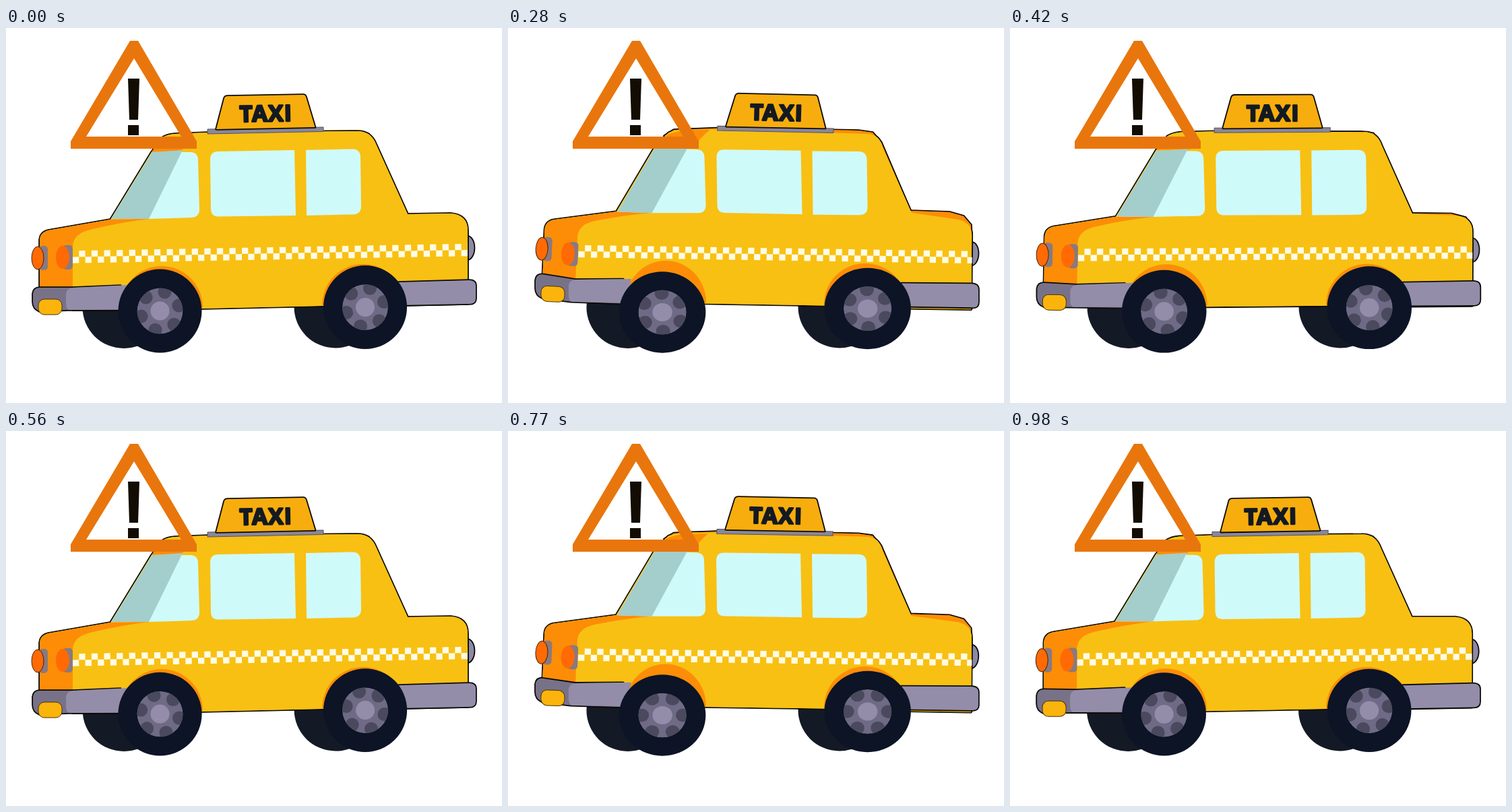
Recreate the animation shown at these times as an HTML page. Size 736 by 556 pixels, loop 1050 ms.

```html
<!DOCTYPE html>
<html lang="en">
<head>
<meta charset="utf-8">
<title>Taxi</title>
<style>
html, body { margin: 0; width: 100%; height: 100%; overflow: hidden; background: #fff; }
svg { display: block; width: 736px; height: 556px; }
text { font: 700 33px "Open Sans", "Noto Sans", sans-serif; letter-spacing: 1.6px; }
.line { stroke: #0b0904; stroke-width: 3.6; stroke-linejoin: round; paint-order: stroke; }
</style>
</head>
<body>
<svg id="stage" viewBox="0 0 736 556"></svg>
<script>
const STEP = 70, LOOP = 1050;
// Body tilt per step: 0 leans forward, 1 leans back.
const TILT = [0, .3, .68, .93, 1, .77, .35, .08, 0, .3, .68, .93, .97, .68, .09];
const YELLOW = '#f8c013', ORANGE = '#fd8d07', GLASS = '#cffafa', GREY = '#938daa';
const stage = document.getElementById('stage');
const mix = (a, b, k) => a + (b - a) * k;

const path = (d, fill, more = '') => `<path d="${d}" fill="${fill}" ${more}/>`;
const oval = (x, y, rx, ry, fill, more = '') =>
  `<ellipse cx="${x}" cy="${y}" rx="${rx}" ry="${ry}" fill="${fill}" ${more}/>`;
const box = (x, y, w, h, r, fill, more = '') =>
  `<rect x="${x}" y="${y}" width="${w}" height="${h}" rx="${r}" fill="${fill}" ${more}/>`;
const group = (matrix, body) => `<g transform="matrix(${matrix.join(' ')})">${body}</g>`;
const LINE = 'class="line"';

function wheel(x, y, q, turn, id) {
  let spots = '';
  for (let i = 0; i < 6; i++) {
    const a = (i * 60 + turn) * Math.PI / 180;
    spots += oval(29 * Math.cos(a), 29 * Math.sin(a), 10, 10, '#4b495d');
  }
  return `<g transform="translate(${x + q * .6} ${y + q * 2})">`
    + oval(0, 0, 62 + q * 2.3, 62 - q * 1.8, '#0c1426')
    + `<clipPath id="${id}"><circle r="34"/></clipPath>`
    + `<g transform="scale(${1 + q * .05} ${1 - q * .03})"><g clip-path="url(#${id})">`
    + oval(0, 0, 34, 34, '#6f6a85') + spots + '</g>'
    + oval(0, 0, 14, 14, GREY) + '</g></g>';
}

function arch(x, y, rx, ry) {
  return path(`M${x - rx},${y}A${rx},${ry} 0 0 1 ${x + rx},${y}Z`, ORANGE);
}

// Far edge of roof and boot, seen when the car leans back.
function farSide(p, more) {
  const from = [232,164, 246,159, 300,157, 520,155, 538,157, 549,176, 596,277, 655,277, 676,282, 684,296, 684,320];
  const to = [232,160, 246,151, 310,148.5, 520,152, 541,155, 554,170, 597,271, 655,273, 676,279, 687,292, 688,320];
  return path('M' + from.map((v, i) => mix(v, to[i], p)).join(' ') + 'L400,320Z', ORANGE, more);
}

function shell(p, more) {
  return path(`M50,390V316Q50,303 63,300L155,284L${216 - 8 * p},184L${231 - 4 * p},163Q238,158 250,157L300,155L520,153
    Q${541 - 2 * p},152 ${549 - 4 * p},172L${596 - 4 * p},${276 - 8 * p}L${660 - 2 * p},275Q${685 - 2 * p},277 ${685 - 2 * p},300
    L${685 + 2 * p},409L595,411L468,412L290,416L99,418Z`, YELLOW, more);
}

function shade(p) {
  return path('M50,390V316Q50,303 63,300L155,284L212,283Q165,289 125,299Q99,305 99,325V388Z', ORANGE)
    + path(`M${216 - 8 * p},184L${231 - 4 * p},165L${mix(232, 250, p)},${mix(172, 158, p)}L${mix(262, 288, p)},${mix(176, 156, p)}
      Q${mix(264, 272, p)},170 ${mix(262, 268, p)},182Z`, ORANGE);
}

function glass(p) {
  const post = 217 - 5.5 * p, low = 212 - 5 * p, high = 262 - 1.5 * p;
  return path(`M156,283L${post},184H273Q285,184 285,196L287,269Q287,280 276,281L${low},283Z`, GLASS)
    + path(`M156,283L${post},184L${high},181L${low},283Z`, '#a3cecb')
    + path('M315,183L428,181L430,278L316,279.5Q304,280 304,268L303,195Q303,183 315,183Z', GLASS)
    + path('M445,181L513,179.5Q526,179 526,192L527,264Q527,276 515,276.5L446,278Z', GLASS);
}

function checks(p) {
  const row = (dy, skip) =>
    `<path d="M${99 + 2.5 * p},${339.5 + 6 * p + dy}L685,${329 + 2 * p + dy}" stroke="#fffbe4" stroke-width="9.2"
      stroke-dasharray="9.3 9.3" stroke-dashoffset="${skip}" fill="none"/>`;
  return row(4.6, 0) + row(-4.6, 9.3);
}

function sign() {
  return path('M299,150L471,147V153.5L299,157Z', '#8b8798', 'stroke="#55525f" stroke-width="1"')
    + path('M329,101L441,99Q444,99 445,102L458.5,147L312,150L324,104Q325,101 329,101Z', '#f7ad0d', LINE)
    + `<text x="386" y="138.5" text-anchor="middle" transform="rotate(-1 385 127)" fill="#141a22"
        stroke="#141a22" stroke-width="2.6" stroke-linejoin="round">TAXI</text>`;
}

function lamps(p) {
  const y = 341 + 3 * p;
  return box(49, y - 18, 13, 36, 5, '#887a80')
    + oval(47, y, 9, 17, '#ff6a05', 'stroke="#4a2308" stroke-width="1"')
    + `<g transform="translate(${2 * p} ${10 * p})">`
    + box(84, 322, 15, 36, 5, '#887a80') + oval(84, 340, 10, 17, '#ff6a05') + '</g>';
}

function frontBumper(p) {
  const s = -6 * p;
  return path(`M40,${394 + s}Q41,${385 + s} 50,${385 + s}L99,385L170,382V418L92,418L50,${420 + s}Q40,${416 + s} 40,${406 + s}Z`, '#787289', LINE)
    + path('M99,385L182,381L174,417L94,418Q89,417 89,408V394Q90,386 99,385Z', GREY)
    + box(48, 402 + s, 35, 23, 9, '#fbb40c', 'stroke="#4a3508" stroke-width="1"');
}

function rearBumper() {
  return path('M583,377L687,374Q697,374 697,382V401Q697,409 688,409L583,411Z', GREY, LINE);
}

function warning() {
  return path('M184,19H196L283,168V179H96V168ZM190,45L119,161H260Z', '#e8760d', 'fill-rule="evenodd"')
    + path('M181,75H198L196,136H183ZM181,144H197V159H181Z', '#120c02');
}

function draw(step) {
  const p = TILT[step];
  const q = (1 - Math.cos(step * STEP / LOOP * 4 * Math.PI)) / 2;
  const turn = -16 - 4 * step;
  const body = [1, .04 * p, -.045 * p, 1 - .009 * p, 18.7 * p, -15.46 * p];
  const panes = [1, .031 * p, 0, 1 - .028 * p, 6.5 * p, -7.35 * p];
  const front = [1, .036 * p, 0, 1, p, -15.5 * p];
  const rear = [1, .036 * p, 0, 1, p, -19.4 * p];
  stage.innerHTML =
    oval(175 + 3 * q, 414, 61.5, 61, '#131a25') + oval(489 + 3 * q, 413.5, 61.5, 61, '#131a25')
    + group(body, oval(684.5 - p, 326, 10, 17, '#8d88a5', LINE))
    + farSide(p, LINE) + group(body, shell(p, LINE))
    + farSide(p) + group(body, shell(p) + shade(p))
    + group(panes, glass(p))
    + group(body, checks(p) + sign() + lamps(p))
    + arch(mix(231, 234, p), mix(414, 407, p), mix(61, 60, p), mix(61, 62, p))
    + arch(530, mix(411, 409, p), 61, mix(61, 60, p))
    + group(front, frontBumper(p)) + group(rear, rearBumper())
    + wheel(228.5, 419.5, q, turn, 'hubA') + wheel(533, 414, q, turn, 'hubB')
    + warning();
}

let shown = -1;
const start = performance.now();
function tick(now) {
  const step = Math.floor(Math.max(0, now - start) % LOOP / STEP);
  if (step !== shown) draw(shown = step);
  requestAnimationFrame(tick);
}
tick(start);
</script>
</body>
</html>
```
